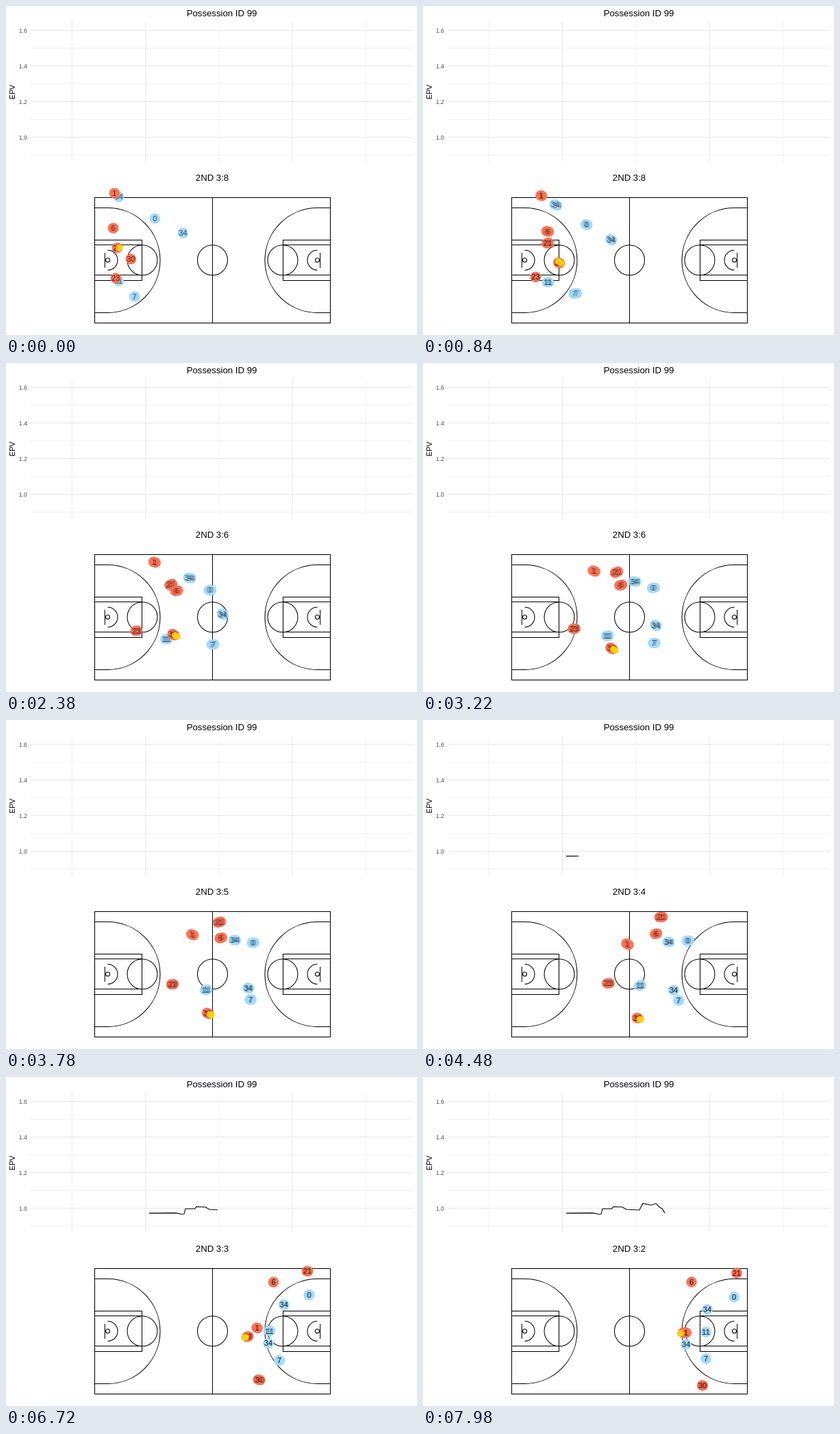
Write an HTML page with a canvas that moves like this. It is 600 by 480 pixels and loops after 8 s.

```html
<!DOCTYPE html>
<html lang="en">
<head>
<meta charset="utf-8">
<title>Possession</title>
<style>
  html, body { margin: 0; width: 100%; height: 100%; overflow: hidden; background: #fff; }
  canvas { display: block; }
</style>
</head>
<body>
<canvas id="stage" width="600" height="480"></canvas>
<script>
const ctx = document.getElementById('stage').getContext('2d');
const LOOP = 8000, STEP = 140, LAST = 57;
const FONT = '"Liberation Sans", Arial, sans-serif';
const MID = 370.8; // height of the line through both hoops

// Each player runs smoothly through a few points, evenly spaced in time.
const player = (label, ...path) => ({ label, path });
const blue = [
  player('34', [164, 278], [250, 310], [342, 322], [395, 328], [415, 339]),
  player('0', [217, 310], [282, 331], [369, 324], [430, 317], [454, 321]),
  player('34', [258, 331], [306, 360], [358, 393], [380, 388], [384, 390]),
  player('11', [164, 401], [220, 404], [300, 392], [363, 372], [413, 372]),
  player('7', [187, 424], [285, 412], [363, 408], [389, 414], [413, 411])
];
const first = player('21', [162, 353], [224, 330], [322, 292], [420, 283], [458, 286]);
const guard = player('30', [182, 369], [232, 389], [301, 431], [345, 437], [408, 450]);
const centre = player('23', [160, 397], [180, 392], [251, 385], [330, 382], [380, 373]);
const red = [
  first,
  player('6', [156, 324], [232, 334], [322, 316], [383, 301], [392, 299]),
  guard,
  centre,
  player('1', [158, 273], [204, 286], [280, 317], [350, 358], [384, 373])
];

// Who holds the ball, and at which side of the body.
const holds = [
  { who: first, from: 0, to: 1, dx: 3, dy: 0 },
  { who: guard, from: 7, to: 37, dx: 4, dy: 2 },
  { who: centre, from: 43, to: LAST + 1, dx: -4, dy: 1 }
];

const epv = [
  [209, 198.6], [248, 198.4], [257, 200.2], [260, 200], [262, 192.2], [275.5, 192.2],
  [278, 189.2], [291, 189.8], [297, 193.3], [316, 194], [321, 184.4], [333, 187],
  [340, 184.6], [346, 190.5], [349, 191.7], [353, 198.6]
];

// Catmull-Rom curve through a player's points.
function place({ path }, step) {
  const end = path.length - 1, t = step / LAST * end;
  const i = Math.min(Math.max(Math.floor(t), 0), end - 1), u = t - i;
  return [0, 1].map(axis => {
    const [a, b, c, d] = [i - 1, i, i + 1, i + 2].map(j => path[Math.min(Math.max(j, 0), end)][axis]);
    return b + u / 2 * (c - a + u * (2 * a - 5 * b + 4 * c - d + u * (3 * (b - c) + d - a)));
  });
}

function held({ who, dx, dy }, step) {
  const [x, y] = place(who, step);
  return [x + dx, y + dy];
}

function ballAt(step) {
  const next = holds.findIndex(h => step <= h.to);
  const taker = holds[next];
  if (step >= taker.from) return held(taker, step);
  const giver = holds[next - 1];
  const u = (step - giver.to) / (taker.from - giver.to);
  const a = held(giver, giver.to), b = held(taker, taker.from);
  return a.map((v, axis) => v + (b[axis] - v) * u);
}

function text(str, x, y, size, color = '#000', align = 'center') {
  ctx.font = `${size}px ${FONT}`;
  ctx.fillStyle = color;
  ctx.textAlign = align;
  ctx.fillText(str, x, y);
}

function line(x1, y1, x2, y2) {
  ctx.beginPath();
  ctx.moveTo(x1, y1);
  ctx.lineTo(x2, y2);
  ctx.stroke();
}

function arc(x, y, r, from = 0, to = 2 * Math.PI) {
  ctx.beginPath();
  ctx.arc(x, y, r, from, to);
  ctx.stroke();
}

function dot([x, y], r, color) {
  ctx.fillStyle = color;
  ctx.beginPath();
  ctx.arc(x, y, r, 0, 2 * Math.PI);
  ctx.fill();
}

function drawChart(step) {
  ctx.lineWidth = 1;
  const grid = major => { ctx.strokeStyle = major ? '#e6e6e6' : '#f1f1f1'; };
  for (let i = 0; i < 8; i++) {
    const y = 35.5 + 26 * i, major = i % 2 === 0;
    grid(major);
    line(36, y, 594, y);
    if (major) text((1.6 - i / 10).toFixed(1), 31, y + 3.2, 8.8, '#4d4d4d', 'right');
  }
  for (let i = 0; i < 5; i++) {
    const x = 96.3 + 107.3 * i;
    grid(i % 2);
    line(x, 23, x, 227);
  }

  text('Possession ID 99', 315, 15, 13.2);
  ctx.save();
  ctx.translate(13.4, 125.5);
  ctx.rotate(-Math.PI / 2);
  text('EPV', 0, 0, 10.8);
  ctx.restore();

  const end = 227.3 + (step - 32) * 5.1;
  if (end <= epv[0][0]) return;
  ctx.save();
  ctx.beginPath();
  ctx.rect(0, 0, end, 230);
  ctx.clip();
  ctx.strokeStyle = '#000';
  ctx.lineWidth = 1.1;
  ctx.beginPath();
  epv.forEach(p => ctx.lineTo(...p));
  ctx.stroke();
  ctx.restore();
}

function drawHalf() {
  const q = Math.PI / 2;
  ctx.strokeRect(129.5, 341.5, 69, 59);
  line(129.5, 348.5, 199, 348.5);
  line(129.5, 392.5, 199, 392.5);
  line(144.3, 360, 144.3, 382);
  arc(199, MID, 22);
  arc(148.5, MID, 3);
  arc(148.5, MID, 14.5, -q, q);
  ctx.beginPath();
  ctx.moveTo(129.5, 294.5);
  ctx.arc(148.5, 371, 76.5, -q, q);
  ctx.lineTo(129.5, 447.5);
  ctx.stroke();
}

function drawCourt() {
  ctx.strokeStyle = '#000';
  ctx.lineWidth = 1.05;
  ctx.strokeRect(129.5, 279.5, 344, 183);
  line(301.5, 279.5, 301.5, 462.5);
  arc(301.5, MID, 22);
  drawHalf();
  ctx.save();
  ctx.translate(603, 0);
  ctx.scale(-1, 1);
  drawHalf();
  ctx.restore();
}

function drawTeam(team, color, times) {
  for (const p of team) {
    const spots = times.map(t => place(p, t));
    for (const spot of spots) dot(spot, 7.5, color);
    for (const [x, y] of spots) text(p.label, x, y + 4, 11, 'rgba(0,0,0,.4)');
  }
}

function draw(now) {
  const step = Math.floor(now % LOOP / STEP);
  // Three tracking samples share each step.
  const times = [-0.32, 0, 0.32].map(d => step + d).filter(t => t >= 0);
  ctx.fillStyle = '#fff';
  ctx.fillRect(0, 0, 600, 480);
  drawChart(step);
  text(`2ND 3:${Math.floor(8.82 - 0.1195 * step)}`, 301, 255, 13.2);
  drawCourt();
  drawTeam(blue, '#a2daff', times);
  drawTeam(red, '#ff7256', times);
  for (const t of times) dot(ballAt(t), 4.5, '#ffd000');
}

let start;
function tick(now) {
  start ??= now;
  draw(now - start);
  requestAnimationFrame(tick);
}
draw(0);
requestAnimationFrame(tick);
</script>
</body>
</html>
```
